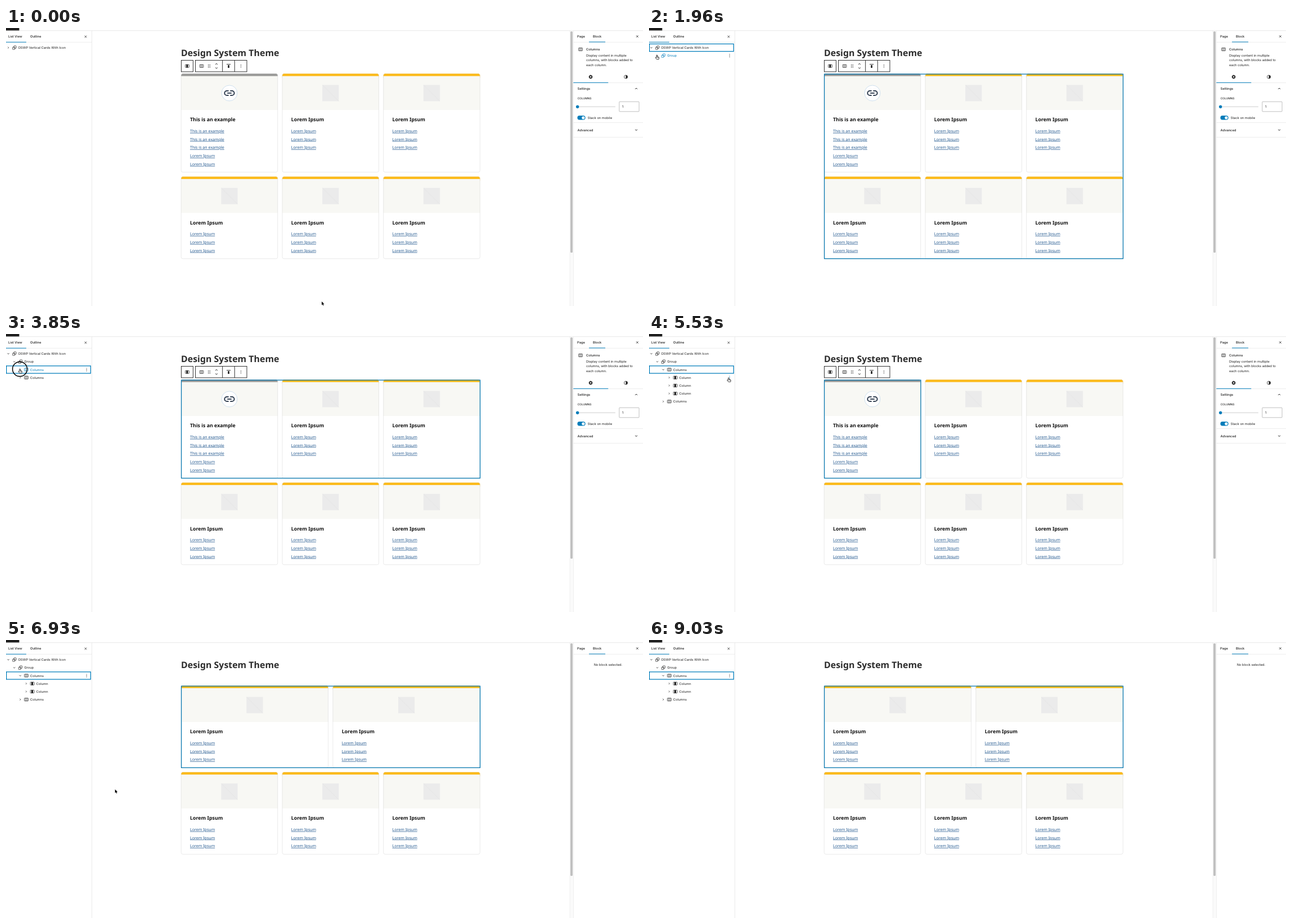
Animation, 1132 px wide and 495 px high, one loop 9170 ms. Source, as an HTML page:

```html
<!DOCTYPE html>
<html lang="en">
<head>
<meta charset="utf-8">
<title>Block editor list view</title>
<style>
html, body { margin: 0; width: 100%; height: 100%; overflow: hidden; background: #fff; }
svg { display: block; width: 100vw; height: 100vh; }
text { font-family: Inter, "DejaVu Sans", sans-serif; font-size: 5.75px; fill: #1e1e1e; text-rendering: geometricPrecision; white-space: pre; }
.m { font-weight: 500; }
.blue { fill: #007cba; }
.page { font-family: "Noto Sans", sans-serif; }
.title { font-size: 15.92px; font-weight: 700; fill: #2d2d2d; }
.head { font-size: 8.84px; font-weight: 700; fill: #111; }
.link { font-size: 7.07px; fill: #255a90; text-decoration: underline; }
</style>
</head>
<body>
<svg id="stage" viewBox="0 0 1132 495" preserveAspectRatio="none"></svg>
<script>
const LOOP = 9170, STEP = 70;
const INK = '#1e1e1e', BLUE = '#007cba', RULE = '#e0e0e0';
const ROW_TOP = 35, ROW_GAP = 14.2;

// --- drawing helpers ---
const rect = (x, y, w, h, fill, extra = '') =>
  `<rect x="${x}" y="${y}" width="${w}" height="${h}" fill="${fill}" ${extra}/>`;
const frame = (x, y, w, h, color = INK, sw = 0.9, rx = 0) =>
  rect(x, y, w, h, 'none', `stroke="${color}" stroke-width="${sw}" rx="${rx}"`);
const line = (d, color = INK, sw = 0.8) =>
  `<path d="${d}" fill="none" stroke="${color}" stroke-width="${sw}"/>`;
const dot = (x, y, r, fill = INK, extra = '') =>
  `<circle cx="${x}" cy="${y}" r="${r}" fill="${fill}" ${extra}/>`;
const raw = (x, y, s, cls, extra = '') => `<text x="${x}" y="${y}" class="${cls}" ${extra}>${s}</text>`;
const label = (x, mid, s, cls = '', extra = '') => raw(x, mid + 2.1, s, cls, extra);

// --- icons, placed by their middle ---
const at = (x, y, s) => `<g transform="translate(${x} ${y})">${s}</g>`;
const icons = {
  group: c => frame(-1, -3.2, 4.2, 4.2, c, 0.7, 0.6) + frame(-3.2, -1, 4.2, 4.2, c, 0.7, 0.6),
  columns: c => frame(-3.4, -2.6, 6.8, 5.2, c, 0.7, 0.6) + line('M-1.2-2.6v5.2M1.2-2.6v5.2', c, 0.7),
  column: c => frame(-3.4, -2.6, 6.8, 5.2, c, 0.7, 0.6) + rect(-1.7, -2.6, 3.1, 5.2, c)
};
const icon = (name, x, y, c = INK) => at(x, y, icons[name](c));
const more = (x, y, c = INK) => [-2.4, 0, 2.4].map(d => dot(x, y + d, 0.6, c)).join('');
const cross = (x, y) => line(`M${x - 1.8} ${y - 1.8}l3.6 3.6m0-3.6l-3.6 3.6`);
const chevrons = { right: 'M-.8-1.5L.7 0-.8 1.5', down: 'M-1.7-.7L0 .8 1.7-.7', up: 'M-1.7.7L0-.8 1.7.7' };
const chevron = (dir, x, y, s = 1) => at(x, y, `<g transform="scale(${s})">${line(chevrons[dir], INK, 0.75)}</g>`);

// --- fixed editor chrome ---
function chrome() {
  return rect(0, 0, 1132, 495, '#fff') + line('M0 4.7H1132', RULE, 0.7) + rect(0, 0, 23.5, 4.4, INK) +
    line('M152.6 5V495M1008.2 5V495', RULE, 0.7) +
    line('M0 25.3H152.6M1008.2 25.3H1132', RULE, 0.6) +
    label(4, 15.3, 'List View', 'm') + label(43, 15.3, 'Outline', 'm') + cross(141.5, 15.4) +
    rect(0, 24.7, 36, 1, BLUE) +
    label(1015, 15, 'Page', 'm') + label(1043, 15, 'Block', 'm') + cross(1121.8, 15) +
    rect(1036, 24.4, 29, 1, BLUE) +
    rect(1002, 5, 6, 490, '#fafafa') + line('M1002 5V495', '#e8e8e8', 0.6) +
    raw(311, 49.8, 'Design System Theme', 'page title');
}

function toolbar() {
  const dots = [-1.3, 1.3].map(x => [-2.3, 0, 2.3].map(y => dot(361 + x, 67.7 + y, 0.65)).join('')).join('');
  return frame(311.5, 57.5, 21, 20.4) + frame(336.5, 57.5, 91.5, 20.4) +
    line('M384.7 57.5v20.4M406.3 57.5v20.4', INK, 0.9) +
    icon('column', 322, 67.7) + icon('columns', 347.5, 67.7) + dots +
    chevron('up', 374, 64.2, 1.2) + chevron('down', 374, 71.2, 1.2) +
    rect(392, 64.2, 7.2, 0.9, INK) + rect(394.3, 66, 2.6, 5, INK) + more(417.5, 67.7);
}

function blockPanel() {
  const teeth = [0, 45, 90, 135].map(a => `<path d="M0-3.4V3.4" stroke="${INK}" stroke-width="1.5" transform="rotate(${a})"/>`).join('');
  const about = ['Display content in multiple', 'columns, with blocks added to', 'each column.'];
  return icon('columns', 1021, 38) + label(1031, 38, 'Columns', 'm') +
    about.map((s, i) => label(1031, 48.4 + 8.6 * i, s)).join('') +
    at(1039, 87, teeth + dot(0, 0, 2.5) + dot(0, 0, 1.2, '#fff')) +
    dot(1101.5, 87, 3, '#fff', `stroke="${INK}" stroke-width=".75"`) +
    `<path d="M1101.5 84a3 3 0 0 1 0 6z" fill="${INK}"/>` +
    line('M1008.2 97.5H1132M1008.2 168.5H1132M1008.2 194.5H1132', RULE, 0.6) + rect(1008.2, 96.8, 62, 1, BLUE) +
    label(1015.5, 108.2, 'Settings', 'm') + chevron('up', 1120, 108, 1.2) +
    `<text x="1015.5" y="126.8" class="m" style="font-size:4.87px">COLUMNS</text>` +
    rect(1015, 139.5, 68, 1.5, '#ddd', 'rx=".7"') + dot(1015.6, 140.2, 2.7, BLUE) +
    frame(1089.8, 131.2, 35.2, 17.6, '#949494', 0.6, 0.8) + label(1094.8, 140.2, '1') +
    rect(1015.4, 156, 14.2, 7.6, BLUE, 'rx="3.8"') + dot(1025.8, 159.8, 2.6, '#fff') +
    label(1033.5, 159.8, 'Stack on mobile') +
    label(1015.5, 181.5, 'Advanced', 'm') + chevron('down', 1120, 181.5, 1.2);
}

// --- cards ---
const LEFT = 311, WIDTH = 531.5, GAP = 7.75;
const cardWidth = n => (WIDTH - GAP * (n - 1)) / n;

function card(x, y, w, h, example) {
  const mid = x + w / 2, icy = y + 34.4;
  const pic = example
    ? dot(mid, icy, 13.9, '#fff', 'stroke="#c3d9ea" stroke-width=".8"') +
      at(mid, icy, line('M-1.3-4H-4.6a4 4 0 0 0 0 8H-1.3M1.3-4H4.6a4 4 0 0 1 0 8H1.3M-3.8 0H3.8', '#1c2b3f', 1.8))
    : rect(mid - 14.6, icy - 14.5, 29.2, 29, '#ebebeb') +
      line(`M${mid - 14.6} ${icy - 14.5}l29.2 29`, '#dedede', 0.5);
  const items = example ? [1, 1, 1, 0, 0] : [0, 0, 0];
  const words = e => e ? 'This is an example' : 'Lorem Ipsum';
  return rect(x, y, w, h, '#fff', 'rx="3"') +
    rect(x, y, w, 9, example ? '#9a9a98' : '#fcba19', 'rx="3"') +
    rect(x, y + 4.1, w, 60.4, '#f8f8f4') +
    frame(x + 0.25, y + 0.25, w - 0.5, h - 0.5, '#d8d8d8', 0.55, 3) + pic +
    rect(x + 2, y, w - 4, 2, example ? '#9a9a98' : '#fcba19') +
    raw(x + 16, y + 84.8, words(example), 'page head') +
    items.map((e, i) => raw(x + 16, y + 104.3 + 14.75 * i, words(e), 'page link')).join('');
}

function cardRow(n, y, h, example) {
  const w = cardWidth(n);
  let s = '';
  for (let i = 0; i < n; i++) s += card(LEFT + i * (w + GAP), y, w, h, example && !i);
  return s;
}

const before = cardRow(3, 81.5, 175.5, true) + cardRow(3, 264.8, 146.2) + toolbar() + blockPanel() +
  rect(1003, 6, 4, 394, '#c1c1c1', 'rx="1.5"');
const after = cardRow(2, 81.5, 146.2) + cardRow(3, 235.5, 146.2) +
  label(1070, 43.7, 'No block selected.', '', 'text-anchor="middle"') +
  rect(1003, 6, 4, 414, '#c1c1c1', 'rx="1.5"');

// --- options menu ---
function menu(scale) {
  const items = [[100.3, 'Copy', '⌘C'], [116.3, 'Duplicate', '⇧⌘D'], [132.3, 'Add before', '⌥⌘T'],
    [148.3, 'Add after', '⌥⌘Y'], [172, 'Copy styles'], [188, 'Paste styles'], [211.3, 'Lock'],
    [227.3, 'Rename'], [243.3, 'Move to'], [267, 'Delete', '⌃⌥Z']];
  const rows = items.map(([y, s, key = '']) => {
    const cls = s === 'Delete' ? 'blue' : '';
    return label(145, y, s, cls) + label(242, y, key, cls, 'text-anchor="end"');
  }).join('');
  return `<g transform="translate(138 89) scale(${scale}) translate(-138 -89)">` +
    rect(137.4, 89.6, 112.2, 190.4, '#000', 'opacity=".06" rx="1.5"') +
    rect(138, 89, 111, 189.5, '#fff', 'stroke="#ccc" stroke-width=".6" rx="1"') +
    frame(141.2, 92.2, 104.6, 16, BLUE, 1.2, 0.8) +
    line('M138 160H249M138 199.5H249M138 255H249', '#ccc', 0.5) + rows +
    frame(234.7, 210.3, 5, 4, INK, 0.75, 0.4) + line('M235.8 210.3v-1.2a1.4 1.4 0 0 1 2.8 0v1.2', INK, 0.7) + '</g>';
}

// --- timeline ---
const OPEN = [1400, 2660, 3990], MENU = 5740, DELETED = 6790;
const CLICKS = [1260, 2520, 3850, 5600, 6650];
const PATH = [
  [0, 561, 487], [70, 458, 372], [140, 328, 214], [210, 328, 214], [280, 162, 46], [350, 162, 46],
  [420, 92, 14], [700, 15, 21], [840, 15, 21], [1190, 4, 35], [1400, 4, 35], [1960, 14, 48.5],
  [2660, 14, 48.5], [3360, 24.6, 62.5], [3990, 24.6, 62.5], [4620, 44, 76], [4760, 50, 77],
  [5530, 141.5, 78], [5810, 141.5, 78], [6510, 193.8, 266], [7700, 193.6, 265.6],
  [8050, 130, 134], [8470, 724, 489.5], [8680, 724, 489.5], [8960, 540, 492], [9030, 540, 500], [LOOP, 540, 500]
];

function pointer(t) {
  const i = PATH.findIndex(p => p[0] > t);
  const a = PATH[i - 1], b = PATH[i];
  const u = (t - a[0]) / (b[0] - a[0]), e = u * u * (3 - 2 * u);
  return [a[1] + (b[1] - a[1]) * e, a[2] + (b[2] - a[2]) * e];
}

function treeRows(t) {
  const level = OPEN.filter(o => t >= o).length;
  const rows = [['group', 0, 'DSWP Vertical Cards With Icon', level > 0]];
  if (level > 0) rows.push(['group', 1, 'Group', level > 1]);
  if (level > 1) rows.push(['columns', 2, 'Columns', level > 2]);
  if (level > 2) for (let i = 0; i < (t < DELETED ? 3 : 2); i++) rows.push(['column', 3, 'Column', false]);
  if (level > 1) rows.push(['columns', 2, 'Columns', false]);
  return rows;
}

function hoveredRow(t, x, y, count) {
  if (t >= DELETED) return 2;
  if (t >= MENU) return 3;
  const i = Math.floor((y - ROW_TOP) / ROW_GAP + 0.5);
  return x < 151 && i >= 0 && i < count ? i : -1;
}

function focusedRow(t) {
  if (t >= DELETED) return 2;
  if (t >= MENU - STEP) return -1;
  return CLICKS.slice(0, 3).filter(c => t >= c).length - 1;
}

function tree(t, rows, hover, x) {
  const focus = focusedRow(t);
  return rows.map(([kind, depth, name, open], i) => {
    const y = ROW_TOP + ROW_GAP * i, dx = 10.6 * depth;
    const hot = i === hover, onMore = x > 135 || t >= MENU;
    const lit = hot && !onMore;
    return chevron(open ? 'down' : 'right', 4.1 + dx, y) +
      icon(kind, 14.9 + dx, y, lit ? BLUE : INK) +
      label(21.9 + dx, y, name, lit ? 'blue' : '') +
      (hot ? more(143.2, y, onMore && t < DELETED ? BLUE : INK) : '') +
      (i === focus ? frame(0.6, y - 6.6, 149.8, 13.2, BLUE, 1.25) : '');
  }).join('');
}

function highlight(t, rows, hover) {
  if (hover < 0) return '';
  const box = (y, h, w = WIDTH) => frame(LEFT + 0.6, y + 0.6, w - 0.6, h - 0.9, '#0878b0', 1.3);
  if (t >= DELETED) return box(81.5, 146.2);
  if (hover < 2) return box(81.5, 329.5);
  if (hover === 2) return box(81.5, 175.5);
  if (rows[hover][0] === 'columns') return box(264.8, 146.2);
  return box(81.5, 175.5, cardWidth(3));
}

function cursor(x, y, hand) {
  return at(x, y, hand
    ? '<path d="M-.8.6A.8.8 0 0 1 .8.6V2.7L3 3.3Q4 3.6 3.9 4.6L3.4 7.2H-.4L-2.6 4.4Q-2.5 3.3-1.5 3.8L-.8 4.4Z" fill="#fff" stroke="#000" stroke-width=".75" stroke-linejoin="round"/>' +
      line('M.8 2.8V4.4M1.9 3.2V4.5M2.9 3.4V4.7', '#000', 0.5)
    : '<path d="M0 0V6.3L1.5 5 2.5 7.3 3.6 6.8 2.6 4.6H4.6Z" fill="#000" stroke="#fff" stroke-width=".5" paint-order="stroke"/>');
}

function scene(t) {
  const [x, y] = pointer(t);
  const rows = treeRows(t), hover = hoveredRow(t, x, y, rows.length);
  const menuOpen = t >= MENU && t < DELETED;
  const clicking = CLICKS.some(c => t >= c && t < c + 2 * STEP);
  const hand = t < DELETED && (hover >= 0 || menuOpen);
  return (t < DELETED ? before : after) + highlight(t, rows, hover) + tree(t, rows, hover, x) +
    (menuOpen ? menu(Math.min(1, 0.38 + (t - MENU) / 150)) : '') +
    cursor(x, y, hand) +
    (clicking ? dot(x, y, 13, 'none', 'stroke="#000" stroke-width="1.5"') : '');
}

const stage = document.getElementById('stage');
stage.innerHTML = chrome() + '<g id="live"></g>';
const live = document.getElementById('live');
let shown = -1;

function draw() {
  const t = Math.floor((performance.now() % LOOP) / STEP) * STEP;
  if (t !== shown) live.innerHTML = scene(shown = t);
  requestAnimationFrame(draw);
}
draw();
</script>
</body>
</html>
```
